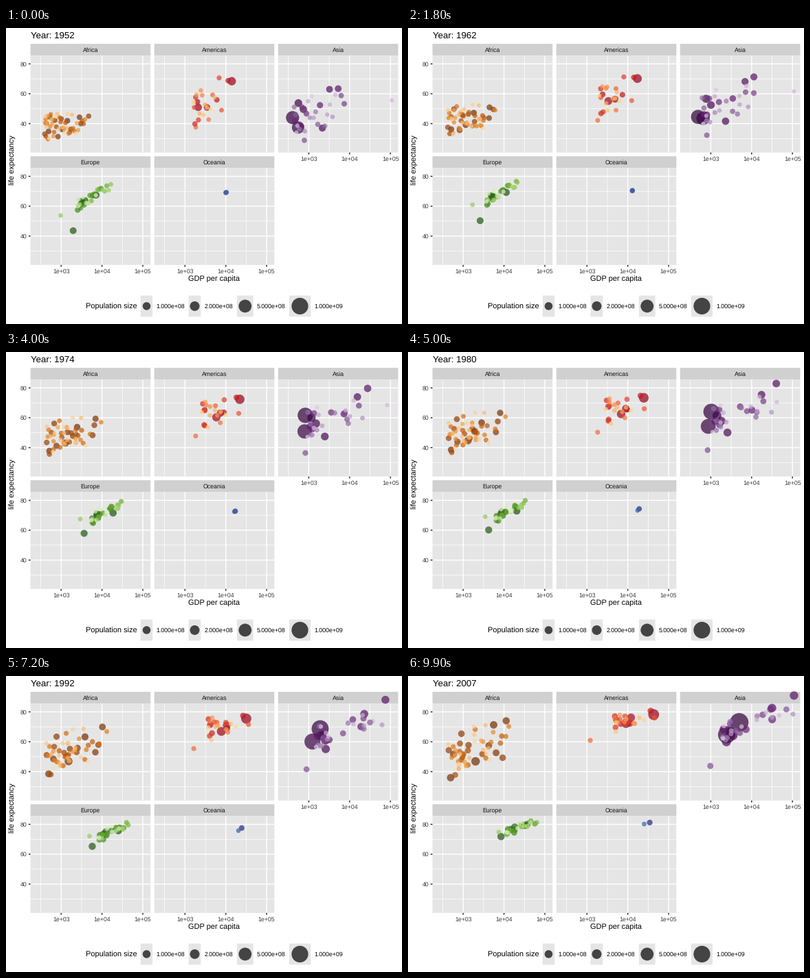
Animation, 576 px wide and 432 px high, one loop 10 s. Source, as a matplotlib script:

```python
import matplotlib.pyplot as plt
import numpy as np
from matplotlib.animation import FuncAnimation
from matplotlib.colors import LinearSegmentedColormap, to_rgb
from matplotlib.patches import Circle, Rectangle

FRAMES, Y0, Y1 = 100, 1952, 2007
W, H = 576, 432
PANEL_W, PANEL_H, STRIP_H = 174.6, 141.4, 17.2
STAGES = [1952, 1969, 1987, 2007]

plt.rcParams.update({"font.family": "Liberation Sans", "text.hinting": "none", "path.snap": False})
rng = np.random.default_rng(7)


def diameter(pop):
    size = 2 + 10 * np.sqrt(pop / 1319)
    return 0.75 * (size * 2.845 + 0.945) + 0.7


def scores(n):
    """Evenly spread standard scores in random order."""
    return rng.permutation(np.linspace(-1.7, 1.7, n))


class Crowd:
    """Many dots scattered around a drifting trend line of life against log GDP."""

    def __init__(self, n, top, decay, gdp, life, spread, slope, noise):
        self.pops = top * np.exp(-decay * np.linspace(0, 1, n))
        self.gdp, self.life = gdp, life
        self.spread, self.slope, self.noise = spread, slope, noise
        self.wealth = scores(n), scores(n)
        self.health = scores(n), scores(n)

    def at(self, year):
        t = (year - Y0) / (Y1 - Y0)
        spread, slope, noise = (a + (b - a) * t for a, b in (self.spread, self.slope, self.noise))
        u, v = (a * np.cos(t) + b * np.sin(t) for a, b in (self.wealth, self.health))
        dx = spread * (u + 0.2 * (u * u - 1))
        x = np.interp(year, STAGES, self.gdp) + dx
        y = np.interp(year, STAGES, self.life) + slope * dx + noise * v
        return np.column_stack([x, y])


class Leader:
    """A dot that stands out: population in millions and {year: (GDP, life)}."""

    def __init__(self, pop, stops):
        self.pop, self.years = pop, list(stops)
        gdp, self.life = zip(*stops.values())
        self.gdp = np.log10(gdp)

    def at(self, year):
        return [np.interp(year, self.years, v) for v in (self.gdp, self.life)]


class Panel:
    def __init__(self, name, col, row, ramp, growth, leaders, crowd=None):
        self.name, self.col, self.row = name, col, row
        self.left = 35.6 + col * (PANEL_W + 5.5)
        self.top = 40.3 + row * (PANEL_H + 5.5 + STRIP_H)
        self.leaders, self.crowd = leaders, crowd
        pops = np.array([d.pop for d in leaders])
        if crowd:
            pops = np.append(pops, crowd.pops)
        self.d0, self.d1 = diameter(pops / growth), diameter(pops)
        rank = np.argsort(np.argsort(-pops)) / (len(pops) - 1)
        cmap = LinearSegmentedColormap.from_list(name, [to_rgb(c) for c in ramp.split()], 512)
        self.colors = cmap(rank)
        self.colors[:, :3] **= 1.2
        self.colors[:, 3] = 0.7

    def x(self, log_gdp):
        return self.left + (log_gdp - 2.2487) * PANEL_W / 2.94

    def y(self, life):
        return self.top + (85.55 - life) * PANEL_H / 64.9

    def dots(self, year):
        pos = np.array([d.at(year) for d in self.leaders])
        if self.crowd:
            pos = np.vstack([pos, self.crowd.at(year)])
        return np.column_stack([self.x(pos[:, 0]), self.y(pos[:, 1])])

    def sizes(self, year):
        return (self.d0 + (self.d1 - self.d0) * (year - Y0) / (Y1 - Y0)) ** 2


panels = [
    Panel("Africa", 0, 0, "#7F3B08 #B35806 #E08214 #FDB863 #FEE0B6", 3.8, [
        Leader(135, {1952: (1077, 36.3), 1987: (1385, 46.9), 2007: (2014, 46.9)}),
        Leader(80, {1952: (1419, 41.9), 2007: (5581, 71.3)}),
        Leader(44, {1952: (4725, 45), 1987: (7826, 60.8), 2007: (9270, 49.3)}),
    ], Crowd(49, 75, 5, gdp=[2.98, 3.11, 3.17, 3.23], life=[39, 45.8, 53.2, 54.8],
             spread=(0.29, 0.41), slope=(4, 12), noise=(4.8, 7))),
    Panel("Americas", 1, 0, "#A50026 #D73027 #F46D43 #FDAE61 #FEE090", 2.4, [
        Leader(301, {1952: (13990, 68.4), 2007: (42952, 78.2)}),
        Leader(33, {1952: (11367, 68.8), 2007: (36319, 80.7)}),
        Leader(190, {1952: (2109, 50.9), 1977: (6660, 61.5), 2007: (9066, 72.4)}),
        Leader(109, {1952: (3478, 50.8), 1982: (9611, 67.4), 2007: (11978, 76.2)}),
        Leader(8.5, {1952: (1840, 37.6), 1987: (1823, 53.6), 2007: (1202, 60.9)}),
    ], Crowd(20, 45, 3.7, gdp=[3.48, 3.64, 3.8, 3.94], life=[53, 61.2, 69, 73.8],
             spread=(0.2, 0.22), slope=(16, 8), noise=(7, 2.6))),
    Panel("Asia", 2, 0, "#40004B #762A83 #9970AB #C2A5CF #E7D4E8", 2.5, [
        Leader(1319, {1952: (400, 44), 1962: (488, 44.5), 1967: (613, 58.4),
                      1987: (1379, 67.3), 2007: (4959, 73)}),
        Leader(1110, {1952: (547, 37.4), 1987: (977, 58.6), 2007: (2452, 64.7)}),
        Leader(127, {1952: (3217, 63), 1972: (14779, 73.4), 2007: (31656, 82.6)}),
        Leader(2.5, {1952: (108382, 55.6), 1972: (109348, 67.7),
                     1982: (31354, 71.3), 2007: (47307, 77.6)}),
        Leader(32, {1952: (779, 28.8), 1987: (852, 40.8), 2007: (975, 43.8)}),
    ], Crowd(28, 220, 5, gdp=[3.12, 3.4, 3.7, 3.88], life=[47, 56.5, 65.5, 71.2],
             spread=(0.36, 0.48), slope=(9, 11), noise=(7, 3.4))),
    Panel("Europe", 0, 1, "#276419 #4D9221 #7FBC41 #B8E186 #E6F5D0", 1.35, [
        Leader(71, {1952: (1969, 43.6), 1972: (3450, 57), 1987: (5089, 63.1), 2007: (8458, 71.8)}),
        Leader(82, {1952: (7144, 67.5), 1972: (18016, 71), 2007: (32170, 79.4)}),
        Leader(4, {1952: (974, 53.8), 1969: (2500, 66), 1987: (4314, 71.1), 2007: (7446, 74.9)}),
    ], Crowd(27, 65, 4.3, gdp=[3.72, 4, 4.19, 4.37], life=[65.6, 70.7, 74.2, 78],
             spread=(0.24, 0.22), slope=(15, 9), noise=(2, 1.2))),
    Panel("Oceania", 1, 1, "#313695 #4575B4", 2.2, [
        Leader(20.4, {1952: (10040, 69.1), 1969: (15400, 71.3), 1987: (21889, 76.3), 2007: (34435, 81.2)}),
        Leader(4.1, {1952: (10557, 69.4), 1969: (15100, 71.6), 1987: (19007, 74.3), 2007: (25185, 80.2)}),
    ]),
]

fig = plt.figure(figsize=(W / 72, H / 72), dpi=72, facecolor="white")
ax = fig.add_axes([0, 0, 1, 1])
ax.set(xlim=(0, W), ylim=(H, 0))
ax.axis("off")


def box(x, y, w, h, color):
    ax.add_patch(Rectangle((x, y), w, h, fc=color, lw=0, zorder=0))


def line(xs, ys, color="white", lw=1.42):
    ax.plot(xs, ys, color=color, lw=lw, solid_capstyle="butt", zorder=1)


def label(x, y, s, size=8.8, color="black", ha="center", **kw):
    return ax.text(x, y, s, size=size, color=color, ha=ha, va="baseline", **kw)


def draw_panel(p):
    right, bottom = p.left + PANEL_W, p.top + PANEL_H
    box(p.left, p.top - STRIP_H, PANEL_W, STRIP_H, "#D0D0D0")
    box(p.left, p.top, PANEL_W, PANEL_H, "#E5E5E5")
    label(p.left + PANEL_W / 2, p.top - 5.3, p.name, color="#121212")
    for v in (30, 50, 70, 40, 60, 80):
        line([p.left, right], [p.y(v)] * 2, lw=1.42 if v % 20 == 0 else 0.71)
    for v in (2.5, 3.5, 4.5, 3, 4, 5):
        line([p.x(v)] * 2, [p.top, bottom], lw=1.42 if v % 1 == 0 else 0.71)
    if p.col == 0:
        for v in (40, 60, 80):
            line([p.left - 2.75, p.left], [p.y(v)] * 2, "#252525")
            label(p.left - 4.95, p.y(v) + 3.2, str(v), color="#3D3D3D", ha="right")
    if p.row == 1 or p.col == 2:
        for v in (3, 4, 5):
            line([p.x(v)] * 2, [bottom, bottom + 2.75], "#252525")
            label(p.x(v), bottom + 12, f"1e+0{v}", color="#3D3D3D")


def draw_legend():
    label(116, 410, "Population size", 11, ha="left")
    for x, w, pop in [(204.5, 17.3, 100), (274.5, 17.6, 200), (347.8, 23.7, 500), (427.5, 31, 1000)]:
        box(x - w / 2, 390.5, w, 30.8, "#E5E5E5")
        ax.add_patch(Circle((x, 405.9), diameter(pop) / 2, fc="black", alpha=0.7, lw=0))
        label(x + w / 2 + 5, 409.4, f"{pop * 1e6:.3e}", ha="left")


for p in panels:
    draw_panel(p)
    p.art = ax.scatter(*p.dots(Y0).T, s=p.sizes(Y0), c=p.colors, linewidths=0, zorder=3)
draw_legend()
label(303, 370, "GDP per capita", 11)
label(12.7, 193, "life expectancy", 11, rotation=90, rotation_mode="anchor")
title = label(35.6, 15, "", 13.2, ha="left")


def update(i):
    year = Y0 + (Y1 - Y0) * i / (FRAMES - 1)
    title.set_text(f"Year: {round(year)}")
    for p in panels:
        p.art.set_offsets(p.dots(year))
        p.art.set_sizes(p.sizes(year))
    return [title, *(p.art for p in panels)]


anim = FuncAnimation(fig, update, frames=FRAMES, interval=100, repeat=True, repeat_delay=0)
plt.show()
```
